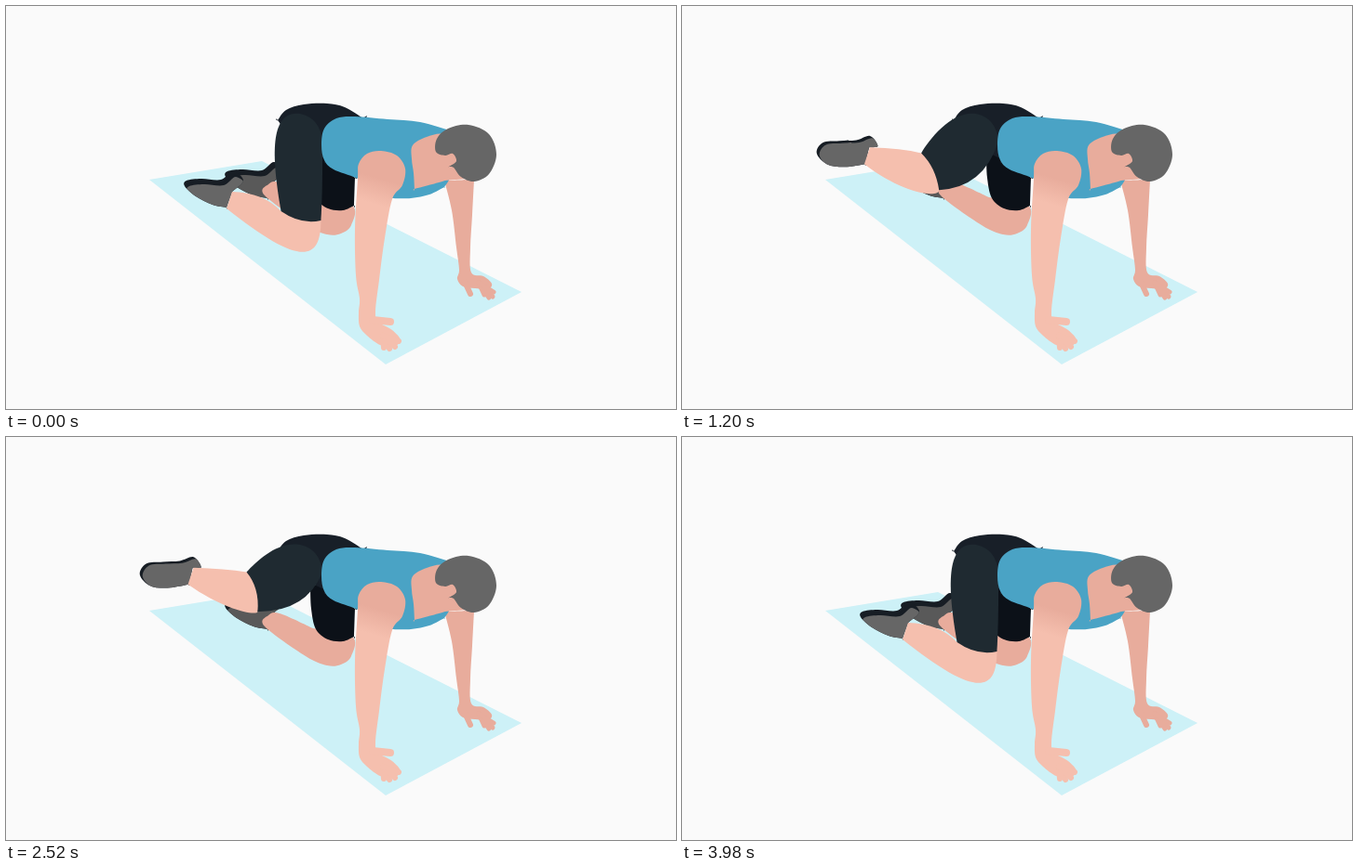
An HTML page with a canvas that plays this animation: 720 by 434 pixels, repeating every 4000 ms.

```html
<!DOCTYPE html>
<html lang="en">
<head>
<meta charset="utf-8">
<title>Leg raise</title>
<style>
html, body { margin: 0; width: 100%; height: 100%; overflow: hidden; background: #fafafa; }
canvas { display: block; width: 720px; height: 434px; }
</style>
</head>
<body>
<canvas id="stage" width="720" height="434"></canvas>
<script>
const ctx = document.getElementById('stage').getContext('2d');
const LOOP = 4000;
const SKIN = '#f5bfae', SHADE = '#e8ac9c', GREY = '#666666', SOLE = '#171d24';

const point = s => s.split(',').map(Number);
const points = s => s.split(' ').map(point);
const add = (a, b) => [a[0] + b[0], a[1] + b[1]];
const mix = (a, b, k) => a.map((v, i) => v + (b[i] - v) * k);
const polar = (deg, r) => [r * Math.cos(deg * Math.PI / 180), r * Math.sin(deg * Math.PI / 180)];

// Closed smooth curve through the points; a doubled point makes a corner.
function blob(pts) {
  const path = new Path2D(), n = pts.length;
  const at = i => pts[(i + n) % n];
  const tangent = i => [(at(i + 1)[0] - at(i - 1)[0]) / 6, (at(i + 1)[1] - at(i - 1)[1]) / 6];
  path.moveTo(...at(0));
  for (let i = 0; i < n; i++) {
    const end = at(i + 1), [tx, ty] = tangent(i + 1);
    path.bezierCurveTo(...add(at(i), tangent(i)), end[0] - tx, end[1] - ty, ...end);
  }
  return path;
}
const shape = s => blob(points(s));

function fill(path, color) {
  ctx.fillStyle = color;
  ctx.fill(path);
}

function fingers(from, tips, width, color) {
  ctx.strokeStyle = color;
  ctx.lineWidth = width;
  ctx.lineCap = 'round';
  for (const tip of points(tips)) {
    ctx.beginPath();
    ctx.moveTo(...from);
    ctx.lineTo(...tip);
    ctx.stroke();
  }
}

const mat = new Path2D('M154 187L275 167L554 308L408 386Z');
const hip = shape('292,123 292,123 301,112 320,106 345,105 364,109 384,121 384,121 344,165 344,165 312,148');
const farCalf = shape('372,215 371,236 360,245 345,246 322,236 278,204 282,192 294,190 330,206 330,206');
const farShorts = shape('327,160 327,160 328,185 333,207 346,218 362,220 374,215 374,215 375,185 375,185 350,160');
const shirt = shape('339,150 342,132 355,121 375,119 410,122 445,125 480,135 480,135 478,180 471,195 471,195 455,203 435,207 412,207 412,207 390,193 376,185 352,176 342,166');
const neck = shape('472,138 452,141 437,150 436,165 438,180 439,197 439,197 458,192 472,188 472,188 495,186 495,186 500,150 500,150');
const hair = shape('462,157 463,143 475,132 497,128 519,138 527,160 519,181 503,189 489,184 481,174 476,173 476,173 484,167 480,159 472,161');
const farArm = shape('471,188 471,188 479,220 484,260 487,284 485,294 491,302 504,304 518,305 522,299 513,291 500,287 499,260 501,225 503,187 503,187');
const nearArm = shape('378,186 379,170 388,159 403,156 420,161 429,175 426,193 415,208 407,250 401,295 397,329 400,340 415,349 424,360 416,367 402,365 388,355 380,345 379,330 380,315 376,290 375,240');

const armShade = ctx.createLinearGradient(396, 184, 388, 211);
armShade.addColorStop(0, SHADE);
armShade.addColorStop(1, SKIN);

// Foot outlines relative to the ankle.
const footDown = points('15,-21 4,-31 -9,-22 -30,-23 -46,-21 -48,-15 -36,-4 -18,5 -3,8 -3,8 3,-9 3,-9');
const footUp = points('11,-9 3,-20 -12,-16 -30,-15 -48,-13 -55,-1 -44,11 -25,13 -2,9 -2,9 2,-9 2,-9');

function drawFoot(ankle, bend, color) {
  const foot = blob(footUp.map((up, i) => mix(up, footDown[i], bend)));
  ctx.save();
  ctx.translate(...ankle);
  fill(foot, SOLE);
  ctx.clip(foot);
  ctx.translate(3, 2 + 4 * bend);
  fill(foot, color);
  ctx.restore();
}

function drawLeg(p) {
  const bend = (1 - p) ** 1.7;
  const angle = 90 + 72 * p;
  const knee = add([317, 138], polar(angle, 88 - 33 * p));
  const half = polar(angle - 77, 22);
  const front = add(knee, half);
  const back = add(knee, [-half[0], -half[1]]);
  const ankle = add(knee, [-77 + 13 * p, -17]);
  const top = add(ankle, [3, -9]);
  const heel = add(ankle, [-3, 9]);

  drawFoot(ankle, bend, GREY);

  const calf = new Path2D();
  calf.moveTo(...top);
  calf.quadraticCurveTo(...add(top, [34, 1]), ...back);
  calf.lineTo(...add(knee, polar(angle, -15)));
  calf.lineTo(...front);
  calf.bezierCurveTo(...add(front, [0, 3 + 46 * bend]), ...add(heel, [40 + 33 * bend, 58 - 34 * p]), ...heel);
  fill(calf, SKIN);
  fill(hip, '#181f28');

  const thigh = new Path2D();
  thigh.moveTo(...back);
  thigh.bezierCurveTo(...add(back, [12 - 23 * bend, -10 - 52 * bend]), 292 - 8 * bend, 112, 316, 116);
  thigh.quadraticCurveTo(338, 121, 340, 146);
  thigh.quadraticCurveTo(...add(front, [54 - 52 * bend, 2 - 36 * bend]), ...front);
  thigh.quadraticCurveTo(...add(knee, polar(angle, 20 * bend - 10)), ...back);
  fill(thigh, '#1f2a31');
}

const ease = t => t * t * (3 - 2 * t);
const ramp = (t, from, to) => ease(Math.min(1, Math.max(0, (t - from) / (to - from))));
const lift = t => ramp(t, 400, 1640) - ramp(t, 2220, 3460);

function draw(t) {
  ctx.fillStyle = '#fafafa';
  ctx.fillRect(0, 0, 720, 434);
  fill(mat, '#cdf1f7');

  drawFoot([284, 199], 1, '#595959');
  fill(farCalf, SHADE);
  fill(farShorts, '#0c1118');
  drawLeg(lift(t));

  fill(farArm, SHADE);
  fingers([493, 297], '499,310', 6, SHADE);
  fingers([508, 298], '514,311 519,314 523,313 524,308', 5, SHADE);
  fill(shirt, '#4aa3c5');
  fill(neck, SHADE);
  fill(hair, GREY);
  fill(nearArm, armShade);
  fingers([394, 338], '413,340', 8, SKIN);
  fingers([405, 355], '406,368 412,369 418,367 422,361', 6, SKIN);
}

const start = performance.now();
function frame() {
  draw((performance.now() - start) % LOOP);
  requestAnimationFrame(frame);
}
frame();
</script>
</body>
</html>
```
